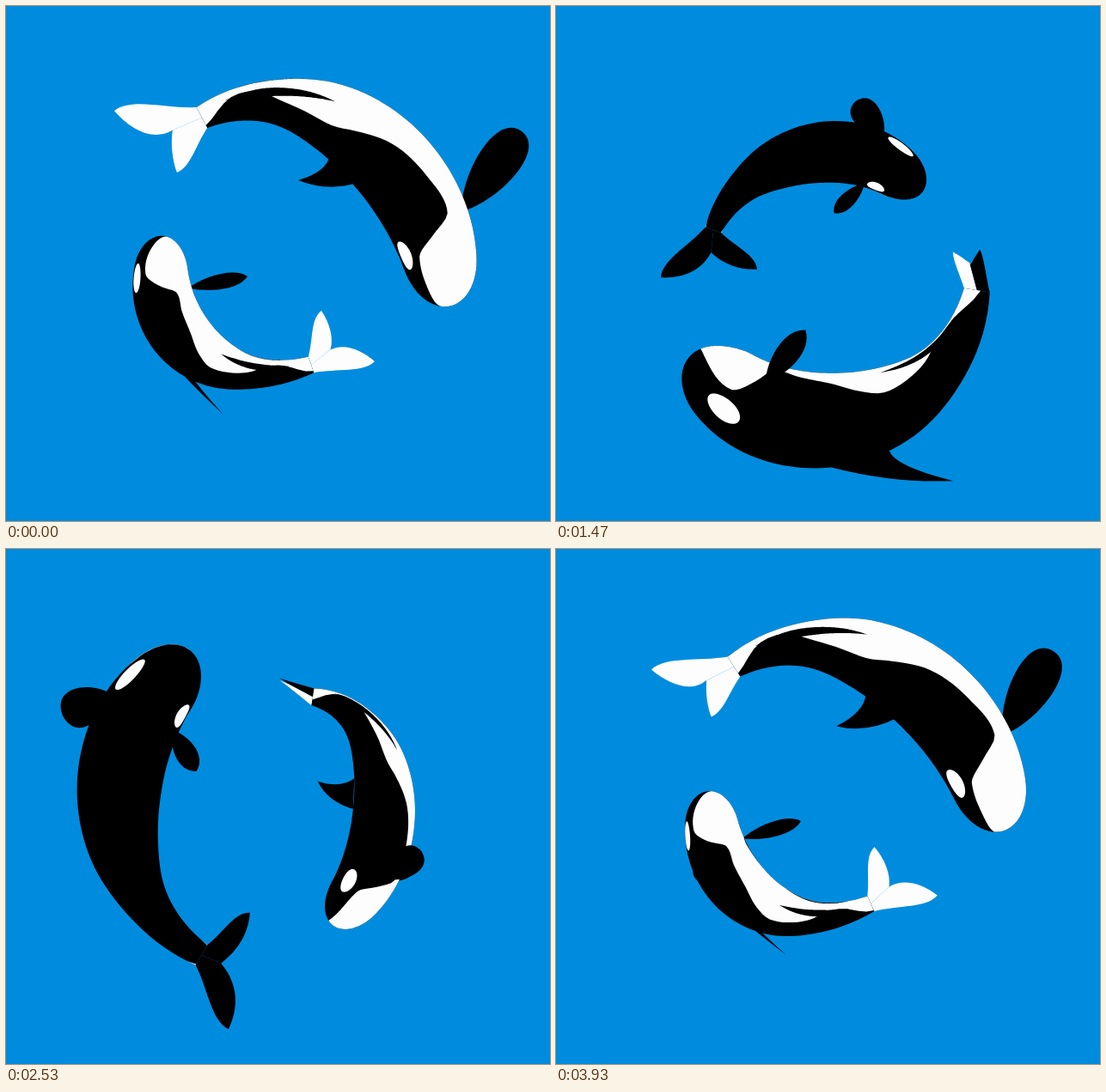
These frames come from a looping animation (633 by 600 pixels, 3970 ms). An HTML page with a canvas:

```html
<!DOCTYPE html>
<html lang="en">
<head>
<meta charset="utf-8">
<title>Circling whales</title>
<style>
  html, body { margin: 0; width: 100%; height: 100%; overflow: hidden; background: #008cde; }
  canvas { display: block; }
</style>
</head>
<body>
<canvas id="sea" width="633" height="600"></canvas>
<script>
const LOOP = 3970, STEPS = 120, CX = 316, CY = 300;
const SEA = '#008cde', BLACK = '#000', WHITE = '#fdfdfd';
const ctx = document.getElementById('sea').getContext('2d');

// Each row: time, roll, girth, then points:
// nose, two along the spine, tail root, two fluke tips, two flipper tips, dorsal tip.
const MOTHER = [
  [0, -62, 50, 507,350, 472,215, 365,124, 228,130, 199,194, 126,122, 452,222, 600,146, 340,203],
  [530, -5, 49, 409,476, 482,366, 482,240, 397,136, 313,195, 318,33, 388,331, 582,390, 490,270],
  [1470, 95, 56, 166,396, 265,478, 402,458, 489,335, 463,290, 492,288, 260,470, 289,375, 457,557],
  [2130, 155, 50, 143,213, 130,335, 207,447, 348,472, 413,492, 352,382, 100,330, 263,311, 174,518],
  [2930, 212, 52, 347,106, 215,143, 133,252, 118,392, 71,488, 165,420, 141,31, 230,150, 197,271],
  [3470, 250, 54, 490,192, 352,121, 207,140, 90,233, 37,265, 63,273, 387,25, 374,60, 277,236]
];
const CALF = [
  [0, 58, 36, 188,269, 190,360, 252,419, 355,418, 367,355, 429,414, 281,315, 172,370, 253,476],
  [530, 112, 40, 254,196, 181,260, 200,357, 272,425, 305,417, 304,427, 195,245, 257,281, 114,388],
  [1470, 180, 36, 423,224, 345,172, 250,188, 184,258, 121,312, 234,305, 353,111, 325,241, 290,165],
  [2130, 232, 38, 439,370, 438,262, 362,173, 268,169, 214,146, 249,203, 538,242, 425,270, 345,244],
  [2930, 310, 35, 281,445, 377,410, 438,335, 428,238, 381,215, 427,163, 385,378, 426,490, 377,318],
  [3470, 352, 35, 187,385, 272,424, 362,418, 430,350, 385,298, 502,295, 291,358, 250,505, 320,430]
];

// Half width over the root of the body position; belly and streak half angles over the position.
const GIRTH = [[0,0],[.1,.32],[.2,.6],[.3,.8],[.4,.9],[.5,.97],[.6,1],[.7,.96],[.8,.8],[.9,.5],[1,.27]];
const BELLY = [[0,92],[.15,92],[.2,62],[.24,31],[.34,33],[.46,42],[.56,62],[.62,73],[.7,70],[.78,57],[.86,25],[.92,32],[1,110]];
const STREAK = [[.64,0],[.72,7],[.82,13],[.88,9],[.93,0]];

const sin = d => Math.sin(d * Math.PI / 180);
const cos = d => Math.cos(d * Math.PI / 180);
const clamp = (v, a, b) => Math.max(a, Math.min(b, v));
const add = (p, q, k = 1) => [p[0] + q[0] * k, p[1] + q[1] * k];
const sub = (p, q) => add(p, q, -1);
const mix = (p, q, k) => add(p, sub(q, p), k);
const dot = (p, q) => p[0] * q[0] + p[1] * q[1];
const size = p => Math.hypot(p[0], p[1]) || 1;
const side = p => [-p[1] / size(p), p[0] / size(p)];

function hermite(a, b, c, d, j, x) {
  const h = c[0] - b[0], k = (x - b[0]) / h;
  const m = (c[j] - a[j]) / (c[0] - a[0]) * h, n = (d[j] - b[j]) / (d[0] - b[0]) * h;
  const e = c[j] - b[j];
  return b[j] + k * (m + k * (3 * e - 2 * m - n + k * (m + n - 2 * e)));
}

function profile(knots, x) {
  const last = knots.length - 1;
  let i = 0;
  while (i < last - 1 && knots[i + 1][0] <= x) i++;
  return hermite(knots[Math.max(0, i - 1)], knots[i], knots[i + 1], knots[Math.min(last, i + 2)], 1, x);
}

// Turns all points of a row about the middle of the stage.
function turn(row, angle) {
  const out = row.slice(), c = Math.cos(angle), s = Math.sin(angle);
  for (let j = 3; j < row.length; j += 2) {
    const x = row[j] - CX, y = row[j + 1] - CY;
    out[j] = CX + x * c - y * s;
    out[j + 1] = CY + x * s + y * c;
  }
  return out;
}

const orbit = t => 2 * Math.PI * t / LOOP;
const settle = rows => rows.map(r => turn(r, -orbit(r[0])));

function poseAt(rows, t) {
  const n = rows.length;
  const key = i => {
    const k = (i + n) % n, laps = (i - k) / n, r = rows[k].slice();
    r[0] += laps * LOOP;
    r[1] += laps * 360;
    return r;
  };
  let i = n - 1;
  while (rows[i][0] > t) i--;
  const near = [key(i - 1), key(i), key(i + 1), key(i + 2)];
  return turn(near[1].map((v, j) => j ? hermite(...near, j, t) : t), orbit(t));
}

function fill(color, points) {
  ctx.fillStyle = color;
  ctx.beginPath();
  points.forEach(p => ctx.lineTo(p[0], p[1]));
  ctx.fill();
}

function drawWhale(rows, t) {
  const pose = poseAt(rows, t), roll = pose[1], girth = pose[2];
  const pts = [];
  for (let j = 3; j < pose.length; j += 2) pts.push([pose[j], pose[j + 1]]);
  const root = pts[3], flukes = [pts[4], pts[5]], flippers = [pts[6], pts[7]], finTip = pts[8];

  const spine = u => {
    const x = 3 * u, a = x - 1, b = x - 2, c = x - 3;
    const k = [-a * b * c / 6, x * b * c / 2, -x * a * c / 2, x * a * b / 6];
    return [0, 1].map(d => k.reduce((sum, w, i) => sum + w * pts[i][d], 0));
  };
  const inward = u => side(sub(spine(u - .004), spine(u + .004)));
  // Point on the skin at an angle from the viewer, positive toward the middle.
  const skin = (u, angle) =>
    add(spine(u), inward(u), girth * profile(GIRTH, Math.sqrt(u)) * sin(angle));

  function strip(color, from, to, center, half, ease = k => k) {
    for (const lap of [-360, 0, 360]) {
      const left = [], right = [], mid = (roll % 360) + center + lap;
      for (let i = 0; i <= 90; i++) {
        const u = from + (to - from) * ease(i / 90), h = Math.max(0, half(u));
        left.push(skin(u, clamp(mid - h, -90, 90)));
        right.unshift(skin(u, clamp(mid + h, -90, 90)));
      }
      fill(color, left.concat(right));
    }
  }

  function fluke(i) {
    const tip = flukes[i], other = flukes[1 - i], a = sub(tip, root), len = size(a);
    const spread = sub(tip, other), open = Math.min(1, size(spread) / len);
    const n = inward(1);
    const edge = add(root, n, girth * .27 * (dot(spread, n) < 0 ? -1 : 1));
    let k = side(a);
    if (dot(k, spread) < 0) k = [-k[0], -k[1]];
    const notch = mix(root, mix(tip, other, .5), 1 - .48 * open);
    const at = (along, out) => add(add(tip, a, along), k, out * len * open);
    ctx.fillStyle = cos(roll + (i ? 15 : -15)) > 0 ? WHITE : BLACK;
    ctx.beginPath();
    ctx.moveTo(...edge);
    ctx.bezierCurveTo(...mix(edge, tip, .38), ...at(-.18, .17), ...tip);
    ctx.bezierCurveTo(...at(-.2, -.2), ...at(-.47, -.32), ...notch);
    ctx.lineTo(...root);
    ctx.fill();
  }

  const flipperAngle = i => roll + (i ? -60 : 60);
  function flipper(i) {
    const base = skin(.23, flipperAngle(i)), tip = flippers[i], a = sub(tip, base);
    const reach = clamp(dot(a, inward(.23)) / girth, -1, 1);
    const k = side(a), wide = girth * (.75 - .25 * reach);
    const blunt = .09 + .09 * reach;
    const at = (along, out) => add(add(base, a, along), k, out * wide);
    ctx.fillStyle = BLACK;
    ctx.beginPath();
    ctx.moveTo(...base);
    ctx.bezierCurveTo(...at(.3, .55), ...at(1 - blunt, .75), ...tip);
    ctx.bezierCurveTo(...at(1 - blunt, -.75), ...at(.3, -.55), ...base);
    ctx.fill();
  }

  function dorsal() {
    const front = skin(.45, roll + 180), back = skin(.58, roll + 180);
    const lead = mix(front, finTip, .5), trail = mix(back, finTip, .5);
    ctx.fillStyle = BLACK;
    ctx.beginPath();
    ctx.moveTo(...front);
    ctx.quadraticCurveTo(...add(lead, sub(lead, back), .4), ...finTip);
    ctx.quadraticCurveTo(...mix(trail, front, .3), ...back);
    ctx.fill();
  }

  const facing = i => cos(flipperAngle(i)) > 0;
  [0, 1].filter(i => !facing(i)).forEach(flipper);
  dorsal();
  (sin(roll) > 0 ? [0, 1] : [1, 0]).forEach(fluke);

  const body = [];
  for (let i = -90; i <= 90; i++) body.push(skin((i / 90) ** 2, i < 0 ? -90 : 90));
  fill(BLACK, body);

  strip(WHITE, 0, 1, 0, u => profile(BELLY, u), k => k * k);
  for (const s of [-1, 1]) {
    strip(BLACK, .64, .93, 34 * s, u => profile(STREAK, u));
    strip(WHITE, .115, .215, 120 * s, u => 15 * Math.sqrt(Math.max(0, 1 - ((u - .165) / .05) ** 2)), k => (1 - Math.cos(Math.PI * k)) / 2);
  }
  [0, 1].filter(facing).forEach(flipper);
}

const mother = settle(MOTHER), calf = settle(CALF);
const start = performance.now();

function frame() {
  const now = (performance.now() - start) % LOOP;
  const t = Math.floor((now + 5) / LOOP * STEPS) % STEPS * LOOP / STEPS;
  ctx.fillStyle = SEA;
  ctx.fillRect(0, 0, 633, 600);
  drawWhale(calf, t);
  drawWhale(mother, t);
  requestAnimationFrame(frame);
}
frame();
</script>
</body>
</html>
```
